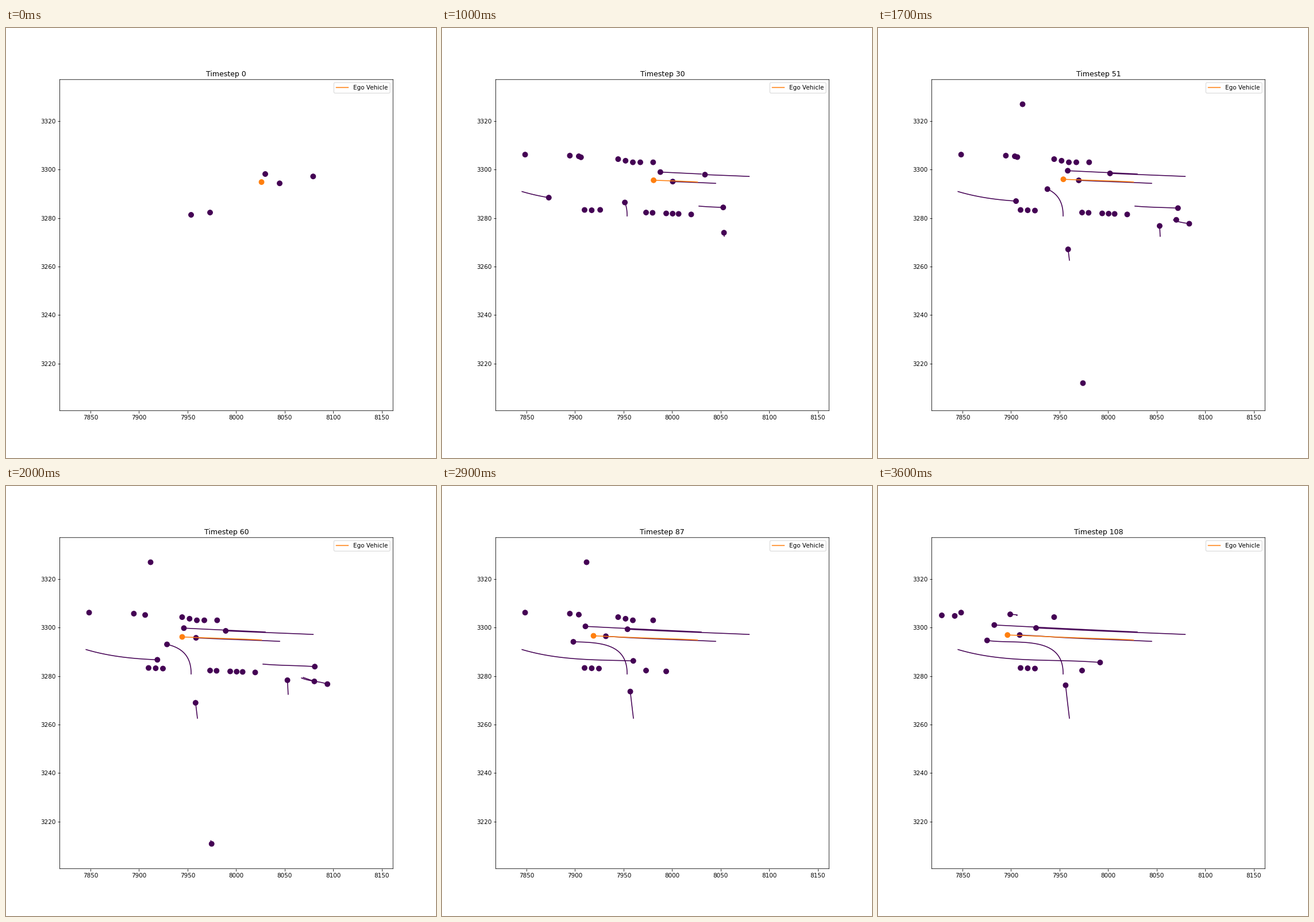
A matplotlib script for the animation above (3700 ms loop, 748 by 748 pixels).

```python
import numpy as np
import matplotlib.pyplot as plt
from matplotlib.animation import FuncAnimation

plt.rcParams["path.snap"] = False

SIZE = 748
FRAMES, STEP = 37, 3
LAST = (FRAMES - 1) * STEP
XLIM = (7818.3, 8161.6)
YLIM = (3200.55, 3337.13)
PURPLE, ORANGE = "#440154", "#ff7f0e"

fig, ax = plt.subplots(figsize=(10, 10), dpi=SIZE / 10)
ax.set(xlim=XLIM, ylim=YLIM)
title = ax.set_title("Timestep 0")
ax.plot([], [], color=ORANGE, label="Ego Vehicle")
ax.legend(loc="upper right")
dots = ax.scatter([], [], s=72, zorder=2.5)
tracks = []


def to_data(xy):
    """Convert stage pixels (y down) to axes data."""
    box = ax.get_position()
    frac = (xy / SIZE * [1, -1] + [0, 1] - box.p0) / box.size
    low, high = np.transpose([XLIM, YLIM])
    return low + frac * (high - low)


def add(start, path, color=PURPLE, z=2):
    """Add a road user with one point per timestep from start."""
    line, = ax.plot([], [], color=color, zorder=z)
    tracks.append((line, start, to_data(path), color))


def drive(start, stop, *ctrl):
    """Move along a Bezier curve at an even pace of its parameter."""
    u = np.linspace(0, 1, stop - start + 1)[:, None]
    pts = [np.array(p, float) for p in ctrl]
    while len(pts) > 1:
        pts = [a + (b - a) * u for a, b in zip(pts, pts[1:])]
    add(start, pts[0])


def cruise(x0, x1, y0, y1, lead, warp=1, **style):
    """Follow a straight lane, running ahead of even pace by up to lead."""
    u = np.linspace(0, 1, LAST + 1)
    x = x0 + (x1 - x0) * u - lead * np.sin(np.pi * u ** warp) ** 2
    y = y0 + (y1 - y0) * u ** warp
    add(0, np.column_stack([x, y]), **style)


def park(start, stop, x, y):
    drive(start, stop, (x, y), (x, y))


def north_curb(x):
    return np.interp(x, [111, 134, 145, 222, 306, 332, 367],
                     [225, 226, 220, 222, 228, 233.6, 233.6])


def south_curb(x):
    return 317 + 0.042 * (x - 260)


# Parked cars: visible from, until, places along the curb
for start, stop, xs in [(3, 96, [222.4, 332, 367.3]), (3, 75, [345]),
                        (6, 51, [238]), (6, 18, [244.5]), (18, 93, [319.3]),
                        (18, LAST, [306.4]), (24, LAST, [144.6]),
                        (90, LAST, [111]), (96, LAST, [133.5])]:
    for x in xs:
        park(start, stop, x, north_curb(x))

for start, stop, xs in [(0, LAST, [355]), (3, 99, [390]),
                        (3, 75, [366.3, 401.2, 411.6, 433.5]),
                        (18, LAST, [248, 260.4]), (51, LAST, [273])]:
    for x in xs:
        park(start, stop, x, south_curb(x))

park(51, 96, 251.5, 132.6)
drive(18, LAST, (241, 225), (243, 224.7), (245, 224), (230, 223.2))
drive(3, 50, (278, 317), (279, 317), (268, 315))

# Waits, then turns out of the side road
park(0, 17, 322, 325)
drive(18, LAST, (322, 327), (322.8, 257), (239.3, 276.2), (189.8, 268.6))

# Eastbound
drive(12, LAST, (139.2, 284.5), (222, 309), (305, 300), (386.4, 307))
drive(1, 72, (447, 309.8), (482, 313), (513, 311.5), (559.5, 316))
drive(1, 12, (631, 302), (655.5, 306.2))
drive(37, 63, (514, 334), (531, 341), (548, 339), (565, 347))
drive(50, 66, (517, 333), (548, 344))

# Slow crossings
drive(1, 12, (490, 355), (490.8, 362.4))
drive(13, 72, (490.8, 362.4), (490.5, 354), (489, 328))
drive(32, LAST, (333, 404), (328, 363), (326.4, 346.6))
drive(50, 66, (356.3, 617), (358, 623.3), (357.8, 623.5))

# Westbound
cruise(451, 202.3, 254, 241.8, lead=3.5)
cruise(476, 246.5, 270.2, 259.2, lead=18.5)
cruise(534.3, 275, 258.2, 247, lead=8.3)
cruise(444.5, 225.3, 268, 259.2, lead=19, warp=0.8, color=ORANGE, z=3)


def update(frame):
    step = frame * STEP
    title.set_text(f"Timestep {step}")
    heads, colors = [], []
    for line, start, path, color in tracks:
        n = step - start + 1
        shown = 0 < n <= len(path)
        line.set_visible(shown)
        if shown:
            line.set_data(*path[:n].T)
            heads.append(path[n - 1])
            colors.append(color)
    dots.set_offsets(heads)
    dots.set_color(colors)
    return [title, dots] + [t[0] for t in tracks]


anim = FuncAnimation(fig, update, frames=FRAMES, interval=100,
                     repeat=True, repeat_delay=0, blit=False)
plt.show()
```
